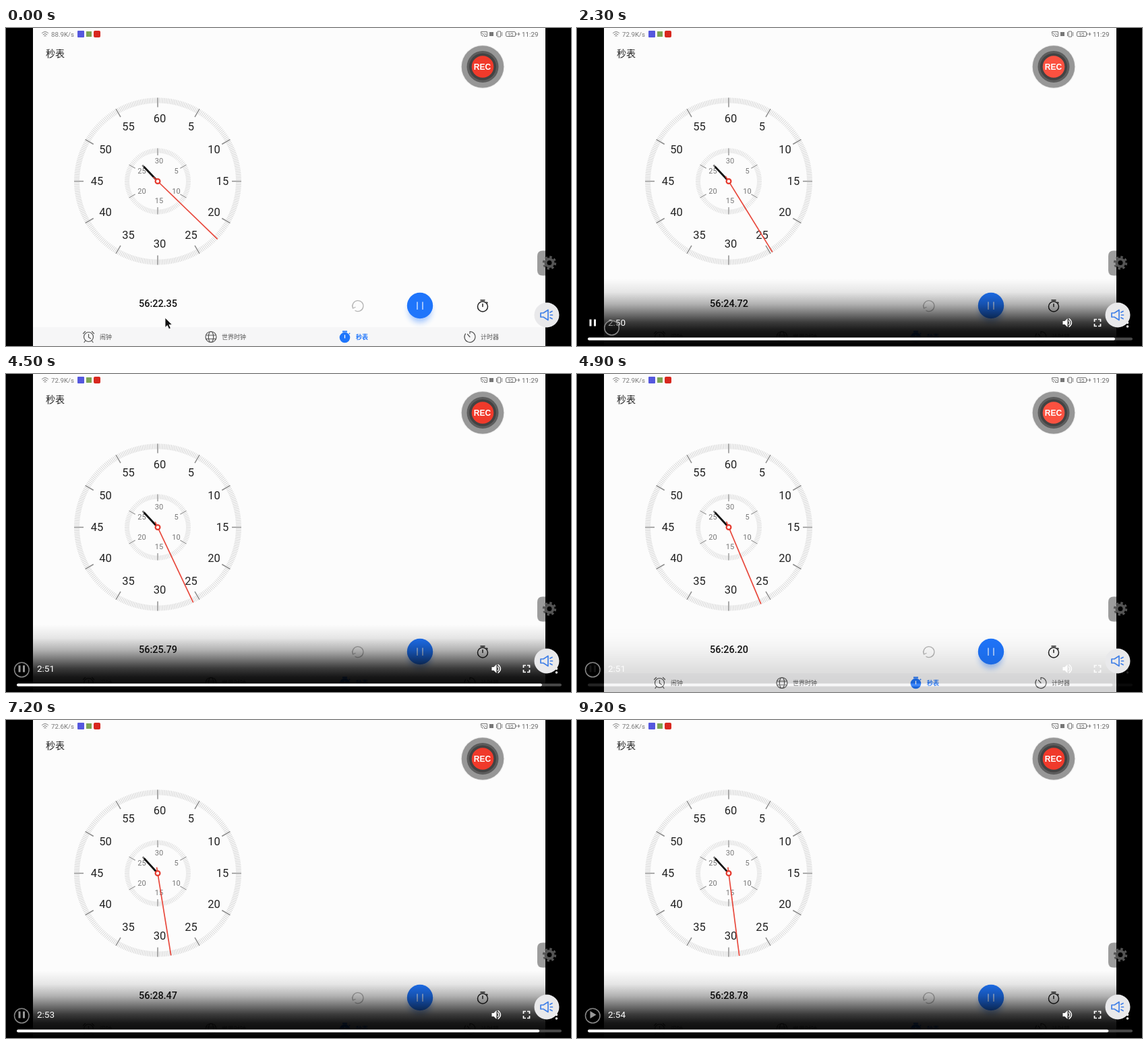
An HTML page that plays this animation: 838 px wide and 472 px high, repeating every 9300 ms.

```html
<!DOCTYPE html>
<html lang="zh">
<head>
<meta charset="utf-8">
<style>
  html, body { margin: 0; width: 100%; height: 100%; overflow: hidden; background: #000; }
  svg { display: block; width: 838px; height: 472px; }
  text { font-family: Roboto, "Noto Sans CJK SC", "Noto Sans CJK", sans-serif; }
  .mid { text-anchor: middle; }
  .line { fill: none; stroke-linecap: round; stroke-linejoin: round; }
</style>
</head>
<body>
<svg viewBox="0 0 838 472">
  <defs>
    <linearGradient id="shade" x1="0" y1="0" x2="0" y2="1">
      <stop offset="0" stop-opacity="0"/>
      <stop offset=".2" stop-opacity=".09"/>
      <stop offset=".38" stop-opacity=".3"/>
      <stop offset=".52" stop-opacity=".54"/>
      <stop offset=".65" stop-opacity=".77"/>
      <stop offset=".78" stop-opacity=".91"/>
      <stop offset="1" stop-opacity="1"/>
    </linearGradient>
    <filter id="blur" x="-50%" y="-50%" width="200%" height="200%"><feGaussianBlur stdDeviation="4"/></filter>
  </defs>

  <rect width="838" height="472"/>
  <rect x="40" width="760" height="472" fill="#fcfcfc"/>
  <rect x="40" y="444" width="760" height="28" fill="#f6f6f7"/>

  <!-- status bar -->
  <g class="line" stroke="#777">
    <path d="M53.500 7.500q4.500-4 9 0M55 9.700q3-2.600 6 0M56.700 11.800q1.300-1 2.600 0"/>
    <path d="M704.500 8v-2.500h9v7h-3M704.500 10q2.500 0 2.500 2.500M704.500 7.800q5 0 5 4.700M710 8l2 2"/>
    <path d="M729.500 5h4v8h-4zM727.500 6.500v5M735.500 6.500v5"/>
    <rect x="741.500" y="5.500" width="14" height="7" rx="1.500"/>
    <path d="M757 8v2M759 9h3M760.500 7v4"/>
  </g>
  <text id="speed" x="67" y="12.700" font-size="9.700" fill="#777"></text>
  <rect x="106" y="4" width="10" height="10" rx="1" fill="#5558de"/>
  <rect x="119" y="5" width="8" height="8" fill="#7da653"/>
  <rect x="130" y="4" width="10" height="10" rx="2" fill="#d8281f"/>
  <rect x="717" y="6" width="6" height="6" fill="#777"/>
  <text class="mid" x="748.500" y="11.600" font-size="7" fill="#777">95</text>
  <text x="765" y="12.700" font-size="9.800" fill="#666">11:29</text>
  <text x="59" y="43" font-size="14" font-weight="500" fill="#222">秒表</text>

  <!-- record button -->
  <circle cx="707" cy="57.500" r="32.500" fill="#eee"/>
  <circle cx="707" cy="57.500" r="31.300" fill="#979797"/>
  <circle cx="707" cy="57.500" r="23.500" fill="#5c5c5c"/>
  <circle cx="707" cy="57.500" r="20" fill="#434343"/>
  <circle id="rec" cx="707" cy="57.500" r="16.300"/>
  <text class="mid" x="706.500" y="61.900" font-size="12" font-weight="700" fill="#fff" style="font-family:'Liberation Sans',sans-serif">REC</text>

  <!-- dial -->
  <g id="dial"></g>
  <g transform="translate(225 227.500)">
    <g id="minute">
      <path d="M0 0V-33" stroke="#777" stroke-width="2.600"/>
      <path d="M0 0V-30" stroke="#111" stroke-width="2.600"/>
    </g>
    <path id="second" d="M0 9V-123.500" stroke="#e8483c" stroke-width="1.700"/>
    <circle r="3.400" fill="#fff" stroke="#e5392d" stroke-width="2.200"/>
  </g>
  <text id="clock" class="mid" x="225.500" y="414" font-size="14.400" font-weight="500" fill="#111"></text>

  <!-- stopwatch buttons -->
  <g class="line" stroke="#b5b5b5" stroke-width="1.300"><path d="M514.500 415.500a8 8 0 1 1 3.500 4M513.500 412l1 4 3.500-1.500"/></g>
  <circle cx="614" cy="420" r="17" fill="#1f74ff" opacity=".4" filter="url(#blur)"/>
  <circle cx="614" cy="412" r="19.200" fill="#1f75fb"/>
  <path d="M610 406.500v11.500M618 406.500v11.500" stroke="#d5e5ff" stroke-width="1.400"/>
  <g class="line" stroke="#222" stroke-width="1.500"><circle cx="707" cy="413.500" r="7.500"/><path d="M704 404h6M707 409.500v4M713 407l1 1"/></g>

  <!-- tabs -->
  <g class="line" stroke="#555" stroke-width="1.200">
    <circle cx="122.500" cy="458.500" r="7"/><path d="M122.500 454.500v4.500l3 2M114.500 453.500l3-3M130.500 453.500l-3-3M117.500 464.500l-1.500 2M127.500 464.500l1.500 2"/>
    <circle cx="304" cy="458.500" r="8"/><ellipse cx="304" cy="458.500" rx="3.700" ry="8"/><path d="M296.500 456h15M296.500 461.500h15"/>
    <path d="M688 450.500a8 8 0 1 1-6.500 3.300M688 450.500v3M684.500 454.500l3.500 4"/>
  </g>
  <circle cx="502.500" cy="459.500" r="7.800" fill="#1f75fb"/>
  <path d="M499 450.500h7M509 453l1 1" stroke="#1f75fb" stroke-width="1.800"/>
  <path d="M502.500 455.500v5" stroke="#fff" stroke-width="1.300"/>
  <g font-size="9" fill="#555">
    <text x="139" y="462">闹钟</text>
    <text x="320" y="462">世界时钟</text>
    <text x="519" y="462" fill="#1f75fb" font-weight="700">秒表</text>
    <text x="704" y="462">计时器</text>
  </g>

  <!-- player controls -->
  <g id="controls">
    <rect y="372" width="838" height="100" fill="url(#shade)"/>
    <path id="toggle" fill="#fff"/>
    <text id="played" x="46" y="442" font-size="13.500" fill="#fff"></text>
    <path d="M720.500 435h3l4-4v13l-4-4h-3z" fill="#fff"/>
    <path class="line" d="M729.500 434.500q2.500 3 0 6M730 431.500q7 6 0 12" stroke="#fff" stroke-width="1.400"/>
    <path d="M767.500 436v-3.500h3.500M773 432.500h3.500v3.500M776.500 439v3.500h-3.500M771 442.500h-3.500v-3.500" fill="none" stroke="#fff" stroke-width="1.700"/>
    <g fill="#fff"><circle cx="816.500" cy="432" r="1.700"/><circle cx="816.500" cy="437.500" r="1.700"/><circle cx="816.500" cy="443" r="1.700"/></g>
    <rect x="16" y="459.500" width="808" height="4" rx="2" fill="#4a4a4a"/>
    <rect id="bar" x="16" y="459.500" height="4" rx="2" fill="#fff"/>
  </g>
  <g id="focus" fill="none" stroke="#fff" transform="translate(22.500 438.500)"><circle r="21" stroke-width="1.500"/><circle r="17.700"/></g>

  <!-- floating buttons -->
  <path d="M800 330.500h-4q-8 0-8 8v21q0 8 8 8h4z" fill="#9c9c9c"/>
  <g transform="translate(806 348.500)" fill="none" stroke="#555">
    <circle r="5.500" stroke-width="4"/>
    <circle r="8.700" stroke-width="3" stroke-dasharray="3.400 3.433"/>
  </g>
  <circle cx="802" cy="426" r="18.500" fill="#e9e9eb"/>
  <g class="line" stroke="#3f7fe8" stroke-width="1.700"><path d="M793 423h4l7-4.500v15l-7-4.500h-4zM807 422l3-1.500M807.500 426h3M807 430l3 1.500"/></g>

  <!-- pointer -->
  <path id="arrow" d="M0 0v14.500l3.300-3 2.400 5.300 2.600-1.200-2.400-5.100h4.500z" fill="#111" stroke="#fff" stroke-width=".8"/>
  <circle id="ring" r="10.800" fill="#000" fill-opacity=".4" stroke="#858585" stroke-width="1.500"/>
</svg>
<script>
const $ = id => document.getElementById(id);
const LOOP = 9300;

// Piecewise linear value at t through [time, value] points.
function track(points, t) {
  let i = 1;
  while (i < points.length - 1 && t > points[i][0]) i++;
  const [t0, a] = points[i - 1], [t1, b] = points[i];
  return a + (b - a) * Math.min(1, Math.max(0, (t - t0) / (t1 - t0)));
}

const elapsed = [[0, 22.35], [1.1, 23.5], [2.3, 24.72], [2.9, 25.33], [4.05, 25.33], [4.9, 26.2], [7.2, 28.47], [7.5, 28.78]];
const fade = [[1.2, 0], [1.4, 1], [4.6, 1], [4.95, 0], [6.2, 0], [6.4, 1]];
const pointerX = [[0, 236], [.3, 225], [1.1, 99], [1.9, 72], [2.3, 51.5], [2.6, 23.3]];
const pointerY = [[0, 430], [.3, 428], [1.1, 407], [1.9, 438], [2.3, 445], [2.6, 439]];

function buildDial() {
  let out = '';
  const ticks = (count, inner, outer, color, width) => {
    let d = '';
    for (let i = 0; i < count; i++) {
      const a = i / count * 2 * Math.PI, s = Math.sin(a), c = -Math.cos(a);
      d += `M${225 + s * inner} ${227.5 + c * inner}L${225 + s * outer} ${227.5 + c * outer}`;
    }
    out += `<path d="${d}" stroke="${color}" stroke-width="${width}"/>`;
  };
  const numbers = (count, cx, radius, size, color) => {
    for (let i = 1; i <= count; i++) {
      const a = i / count * 2 * Math.PI;
      out += `<text class="mid" x="${cx + Math.sin(a) * radius}" y="${227 - Math.cos(a) * radius + size * .36}" font-size="${size}" fill="${color}">${i * 5}</text>`;
    }
  };
  ticks(300, 116, 124, '#d2d2d2', 1);
  ticks(12, 110, 124, '#8e8e8e', 1.5);
  ticks(120, 42, 49, '#d4d4d4', .9);
  ticks(6, 38.5, 49, '#999', 1.4);
  numbers(12, 228, 93, 16.5, '#222');
  numbers(6, 227, 29.5, 11, '#777');
  $('dial').innerHTML = out;
}

function draw(t) {
  const s = track(elapsed, t);
  const playing = t < 2.9 || (t >= 4.05 && t < 7.5);
  $('clock').textContent = '56:' + s.toFixed(2);
  $('second').setAttribute('transform', `rotate(${s * 6})`);
  $('minute').setAttribute('transform', `rotate(${(26 + s / 60) * 12})`);
  $('speed').textContent = (s < 24 ? '88.9' : s < 27 ? '72.9' : '72.6') + 'K/s';
  const pulse = s % 1.6;
  $('rec').setAttribute('fill', pulse > .4 && pulse < 1.2 ? '#fb5140' : '#f03a2b');

  $('controls').setAttribute('opacity', track(fade, t));
  $('toggle').setAttribute('d', playing ? 'M18.500 432.500h3v10h-3zM25 432.500h3v10h-3z' : 'M19.500 432l9 5.500-9 5.500z');
  const seconds = Math.floor(s + 145.3);
  $('played').textContent = Math.floor(seconds / 60) + ':' + seconds % 60;
  $('bar').setAttribute('width', 782 - 1.4 * (t - 2.3));

  const pressed = [2.9, 3.9, 7.5].some(p => t >= p && t < p + .2);
  $('focus').setAttribute('visibility', pressed ? 'visible' : 'hidden');
  const place = `translate(${track(pointerX, t)} ${track(pointerY, t)})`;
  const overControls = t >= 2;
  $('arrow').setAttribute('transform', place);
  $('ring').setAttribute('transform', place);
  $('arrow').setAttribute('visibility', overControls ? 'hidden' : 'visible');
  $('ring').setAttribute('visibility', overControls ? 'visible' : 'hidden');
}

buildDial();
const start = performance.now();
function tick() {
  const ms = (performance.now() - start) % LOOP;
  draw(Math.floor(ms / 100) / 10);
  requestAnimationFrame(tick);
}
tick();
</script>
</body>
</html>
```
